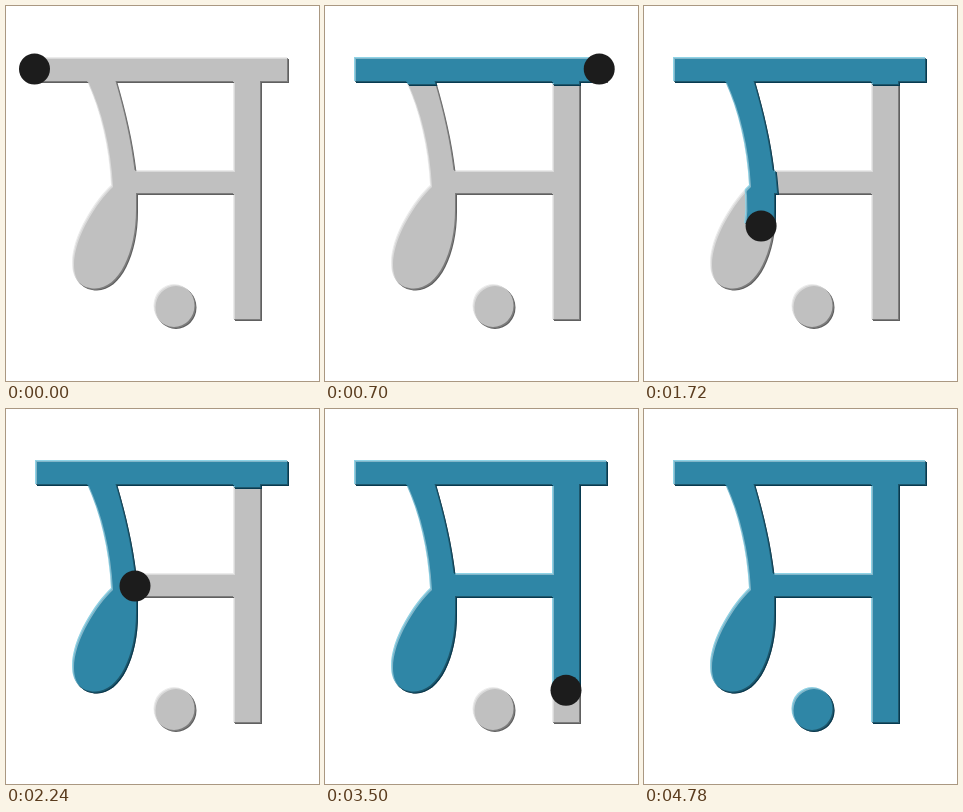
Write an HTML page that moves like this. It is 313x375 px and loops after 4.8 s.

```html
<!DOCTYPE html>
<html lang="en">
<head>
<meta charset="utf-8">
<title>Letter stroke order</title>
<style>
  html, body { margin: 0; width: 100%; height: 100%; overflow: hidden; background: #fff; }
  svg { display: block; width: 313px; height: 375px; }
</style>
</head>
<body>
<svg viewBox="0 0 313 375">
  <defs>
    <path id="letter" d="M30 52H282V76H255V314H228V188H131V205
      C131 247 114 283.500 90 283.500C77 283.500 67 275 67 258C67 230 90 195 106 180
      C104 140 95 105 82 76H30Z
      M110.500 76C119 105 126 135 129.500 165H228V76Z
      M148.500 300.500a20.500 21.500 0 1 0 41 0a20.500 21.500 0 1 0 -41 0Z" fill-rule="evenodd"/>
    <mask id="drawn" maskUnits="userSpaceOnUse" x="0" y="0" width="313" height="375">
      <path id="trail" fill="none" stroke="#fff" stroke-width="32" stroke-linejoin="miter"/>
    </mask>
    <!-- Soft inner rim: light at top left, dark at bottom right -->
    <filter id="rim" filterUnits="userSpaceOnUse" x="0" y="0" width="313" height="375" color-interpolation-filters="sRGB">
      <feOffset in="SourceAlpha" dx="1" dy="1" result="down"/>
      <feOffset in="SourceAlpha" dx="-1" dy="-1" result="up"/>
      <feFlood flood-color="#fff" flood-opacity=".4"/>
      <feComposite operator="in" in2="SourceAlpha"/>
      <feComposite operator="out" in2="down" result="light"/>
      <feFlood flood-color="#000" flood-opacity=".35"/>
      <feComposite operator="in" in2="SourceAlpha"/>
      <feComposite operator="out" in2="up" result="dark"/>
      <feMerge>
        <feMergeNode in="SourceGraphic"/>
        <feMergeNode in="light"/>
        <feMergeNode in="dark"/>
      </feMerge>
    </filter>
    <g id="ink"><g mask="url(#drawn)"><use href="#letter"/></g></g>
  </defs>
  <g>
    <use href="#letter" x="-1" y="-1" fill="#ebebeb"/>
    <use href="#letter" x="1" y="1" fill="#606060"/>
    <use href="#letter" fill="#c0c0c0" filter="url(#rim)"/>
  </g>
  <g>
    <use href="#ink" x="-1" y="-1" fill="#8fd3e6"/>
    <use href="#ink" x="1" y="1" fill="#073a50"/>
    <use href="#ink" fill="#2f86a6" filter="url(#rim)"/>
  </g>
  <circle id="pen" r="15.500" fill="#1c1c1c"/>
</svg>
<script>
  const LOOP = 4800, PEN_OFF = 4560;
  const trail = document.getElementById('trail');
  const pen = document.getElementById('pen');

  // Each stroke: path piece and the time at which the pen reaches its end.
  const strokes = [
    ['M28.5 63H283', 725],
    ['H95', 1260],
    ['C102 92 114 135 118 188C121 232 106 271 91 271C73 271 79 236 93 212C104 194 115 177 129 177', 2240],
    ['H241', 2556],
    ['V63', 2879],
    ['V315', 3596],
    ['L179 302', 3804],
    ['A10 10 0 1 1 159 302A10 10 0 1 1 179 302', 3984],
    ['H163', 4030]
  ];

  let d = '';
  const keys = [[0, 0]];
  for (const [piece, end] of strokes) {
    d += piece;
    trail.setAttribute('d', d);
    keys.push([end, trail.getTotalLength()]);
  }
  const total = keys[keys.length - 1][1];

  function lengthAt(t) {
    for (let i = 1; i < keys.length; i++) {
      const [t0, a] = keys[i - 1], [t1, b] = keys[i];
      if (t < t1) return a + (b - a) * (t - t0) / (t1 - t0);
    }
    return total;
  }

  function draw(t) {
    const len = lengthAt(t);
    const p = trail.getPointAtLength(len);
    trail.setAttribute('stroke-dasharray', len >= total ? 'none' : len + ' ' + (total + 50));
    trail.setAttribute('visibility', len > 0 ? 'visible' : 'hidden');
    pen.setAttribute('cx', p.x);
    pen.setAttribute('cy', p.y);
    pen.setAttribute('visibility', t < PEN_OFF ? 'visible' : 'hidden');
  }

  const start = performance.now();
  function tick() {
    const t = (performance.now() - start) % LOOP;
    draw(Math.floor(t / 20) * 20);
    requestAnimationFrame(tick);
  }
  draw(0);
  requestAnimationFrame(tick);
</script>
</body>
</html>
```
